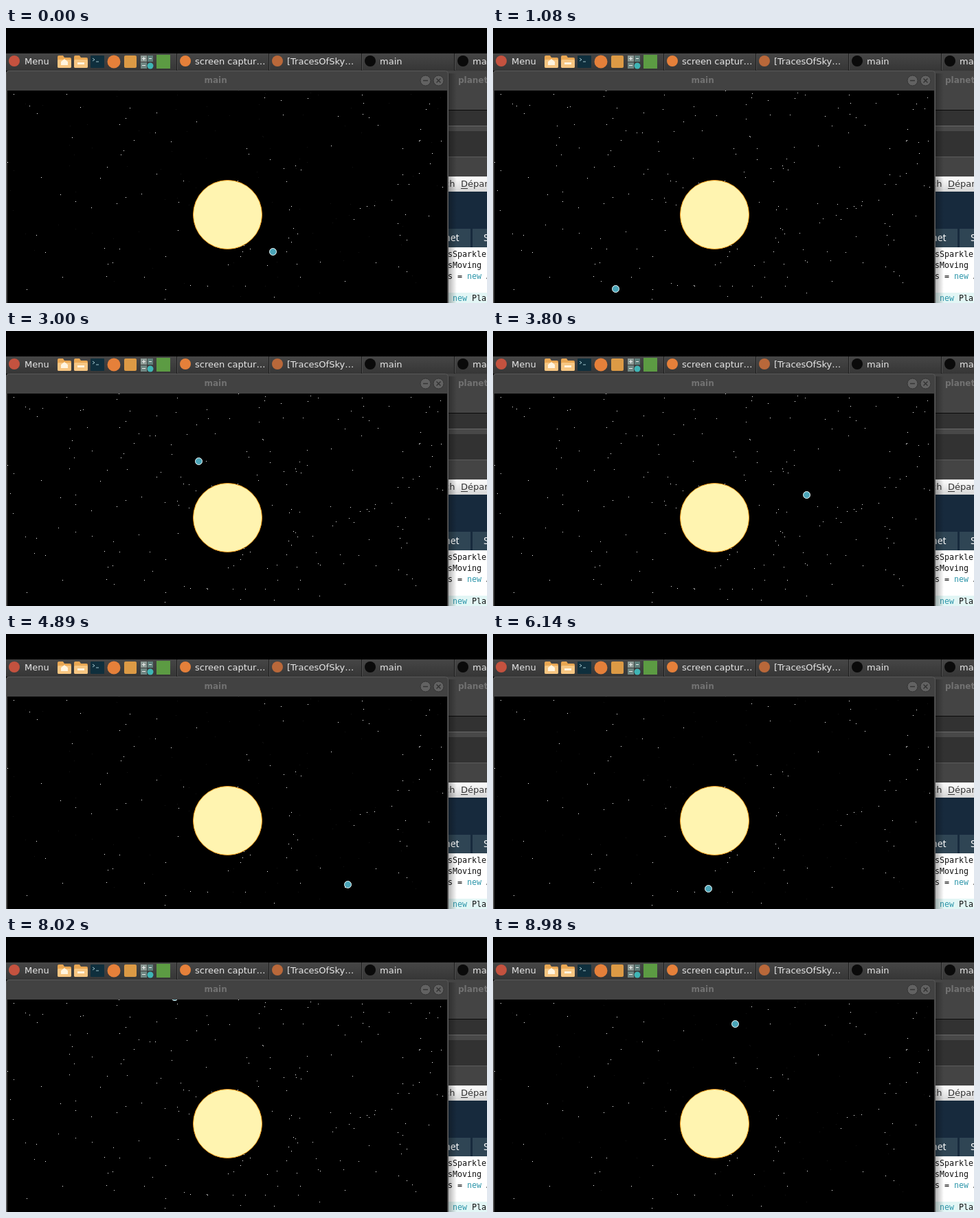
These frames come from a looping animation (700x400 px, 9000 ms). An HTML page:

```html
<!DOCTYPE html>
<html lang="en">
<head>
<meta charset="utf-8">
<title>Orbit</title>
<style>
  html, body { margin: 0; width: 100%; height: 100%; overflow: hidden; background: #000; }
  svg { display: block; }
  text { white-space: pre; }
  .ui { font: 13px "DejaVu Sans", sans-serif; fill: #e6e6e6; }
  .menu { fill: #333; }
  .title { font: bold 12px "DejaVu Sans", sans-serif; fill: #727272; }
  .tab { font: 14px "Noto Sans", sans-serif; fill: #fff; }
  .code { font: 11.63px "DejaVu Sans Mono", monospace; fill: #111; }
  .key { fill: #2f97ab; }
  .stars { fill: #fff; shape-rendering: crispEdges; }
</style>
</head>
<body>
<svg width="700" height="400" viewBox="0 0 700 400">
  <defs>
    <linearGradient id="panel" x2="0" y2="1">
      <stop stop-color="#464646"/><stop offset="1" stop-color="#363636"/>
    </linearGradient>
    <linearGradient id="menubar" x2="0" y2="1">
      <stop stop-color="#fff"/><stop offset="1" stop-color="#d6d6d6"/>
    </linearGradient>
    <linearGradient id="shadow">
      <stop stop-opacity=".3"/><stop offset="1" stop-opacity="0"/>
    </linearGradient>
    <clipPath id="view"><rect x="2" y="91" width="640" height="309"/></clipPath>
    <g id="folder">
      <path d="M0 2q0-2 2-2h6l2 3h8q2 0 2 2v11q0 2-2 2H2q-2 0-2-2z" fill="#e9a753"/>
      <rect y="6" width="20" height="12" rx="2" fill="#f7c682"/>
    </g>
  </defs>
  <rect width="700" height="400"/>

  <!-- desktop panel -->
  <rect y="37" width="700" height="25" fill="url(#panel)"/>
  <path d="M248.500 37v25M382.500 37v25M517.500 37v25M652.500 37v25" stroke="#1d1d1d"/>
  <path d="M249.500 38v23M383.500 38v23M518.500 38v23M653.500 38v23" stroke="#4f4f4f"/>
  <circle cx="12" cy="48" r="8" fill="#c4523f"/>
  <text class="ui" x="27" y="53">Menu</text>
  <use href="#folder" x="75" y="40"/>
  <path d="M80 49l5-4 5 4v5H80z" fill="#fff4df"/>
  <use href="#folder" x="99" y="40"/>
  <rect x="104" y="50" width="10" height="3" fill="#fff4df"/>
  <rect x="123" y="40" width="20" height="18" rx="1" fill="#0f2f3d"/>
  <path d="M126 44l3 2-3 2M131 49h4" fill="none" stroke="#9fc4cc"/>
  <circle cx="157" cy="49" r="9.500" fill="#e5803a"/>
  <rect x="172" y="40" width="18" height="18" rx="2" fill="#dc9a45"/>
  <rect x="196" y="40" width="9" height="9" fill="#8b9994"/>
  <rect x="206" y="40" width="8" height="9" fill="#5f7f7b"/>
  <rect x="196" y="50" width="9" height="9" fill="#6e8581"/>
  <circle cx="210" cy="55" r="4.500" fill="#3fb5b5"/>
  <path d="M198 44.500h5M200.500 42v5M208 44.500h4M198 54.500h5" stroke="#eee"/>
  <rect x="219" y="39" width="20" height="20" fill="#5c9b43"/>
  <circle cx="261" cy="48" r="8" fill="#e5803a"/>
  <text class="ui" x="275" y="53">screen captur…</text>
  <circle cx="395" cy="48" r="8" fill="#b9683a"/>
  <text class="ui" x="409" y="53">[TracesOfSky…</text>
  <circle cx="530" cy="48" r="8" fill="#0a0a0a"/>
  <text class="ui" x="544" y="53">main</text>
  <circle cx="665" cy="48" r="8" fill="#0a0a0a"/>
  <text class="ui" x="679" y="53">main</text>

  <!-- editor window behind -->
  <rect x="640" y="62" width="60" height="57" fill="#444"/>
  <text class="title" x="658" y="80">planet</text>
  <rect x="640" y="119" width="60" height="1" fill="#090909"/>
  <rect x="640" y="120" width="60" height="22" fill="#323232"/>
  <rect x="640" y="142" width="60" height="1" fill="#6a6a6a"/>
  <rect x="640" y="143" width="60" height="7" fill="#484848"/>
  <rect x="640" y="150" width="60" height="37" fill="#323232"/>
  <rect x="640" y="187" width="60" height="1" fill="#5c5c5c"/>
  <rect x="640" y="188" width="60" height="28" fill="#444"/>
  <rect x="640" y="216" width="60" height="22" fill="url(#menubar)"/>
  <text class="ui menu" x="638" y="231">ch</text>
  <text class="ui menu" x="662" y="231">Départ</text>
  <path d="M662 233.500h10" stroke="#333"/>
  <rect x="640" y="238" width="60" height="82" fill="#172a3d"/>
  <path d="M640 292h36v27h-36zM679 292h21v27h-21z" fill="#2f4554"/>
  <text class="tab" x="638" y="310">net</text>
  <text class="tab" x="695" y="310">S</text>
  <rect x="640" y="319" width="60" height="81" fill="#fff"/>
  <rect x="640" y="385" width="60" height="15" fill="#e2f6f5"/>
  <text class="code" x="643" y="333">sSparkle</text>
  <text class="code" x="643" y="349">sMoving</text>
  <text class="code" x="643" y="365">s = <tspan class="key">new</tspan> A</text>
  <text class="code" x="650" y="397"><tspan class="key">new</tspan> Pla</text>
  <rect x="644" y="66" width="12" height="334" fill="url(#shadow)"/>

  <!-- sketch window -->
  <path d="M0 400V66q0-4 4-4h636q4 0 4 4v334z" fill="#424242"/>
  <path d="M.5 400V66.500q0-4 4-4h635q4 0 4 4V400" fill="none" stroke="#595959"/>
  <text class="title" x="288.500" y="80">main</text>
  <g fill="#626262" stroke="#353535">
    <circle cx="610.500" cy="76.500" r="7.500"/><circle cx="629.500" cy="76.500" r="7.500"/>
    <path d="M607 76.500h7M626.500 73.500l6 6M632.500 73.500l-6 6" stroke-width="1.500"/>
  </g>
  <g clip-path="url(#view)">
    <rect width="700" height="400"/>
    <path id="steady" class="stars"/>
    <path id="twinkle" class="stars"/>
    <circle cx="322.500" cy="271.500" r="50" fill="#fff4b0" stroke="#ffa51f"/>
    <circle id="planet" r="5" fill="#4ba5b8" stroke="#f2fafa"/>
  </g>
</svg>
<script>
const el = id => document.getElementById(id);
const { sin, cos, PI, floor, round, min, max } = Math;

let seed = 71;
const rand = () => (seed = seed * 16807 % 2147483647) / 2147483647;
const scatter = n => Array.from({ length: n }, () =>
  `M${2 + floor(rand() * 634)} ${91 + floor(rand() * 308)}h1v1h-1z`).join('');

el('steady').setAttribute('d', scatter(115));
el('twinkle').setAttribute('d', scatter(105));

// Precessing orbit: the radius swings between 84 and 199 around the sun.
function orbit(t) {
  const mean = -0.123 + 2.03 * t - 0.008 * t * t;
  let p = mean;
  for (let i = 0; i < 8; i++) p -= (p - 0.305 * sin(p) - mean) / (1 - 0.305 * cos(p));
  const r = 141.5 - 57.5 * cos(p);
  const a = 0.866 + 0.621 * p + 0.33 * sin(p) + 0.039 * sin(2 * p);
  return [322.5 + round(r * cos(a)), 271.5 + round(r * sin(a))];
}

const STEP = 40.08;

function draw(ms) {
  const frame = floor((ms % 9000 + 10) / STEP);
  const [x, y] = orbit(frame * STEP / 1000);
  el('planet').setAttribute('cx', x);
  el('planet').setAttribute('cy', y);
  const glow = 0.75 * (1 - cos(frame / 10.2 * 2 * PI));
  el('twinkle').setAttribute('opacity', min(0.9, max(0.08, glow)));
}

const start = performance.now();
function tick() {
  draw(performance.now() - start);
  requestAnimationFrame(tick);
}
tick();
</script>
</body>
</html>
```
